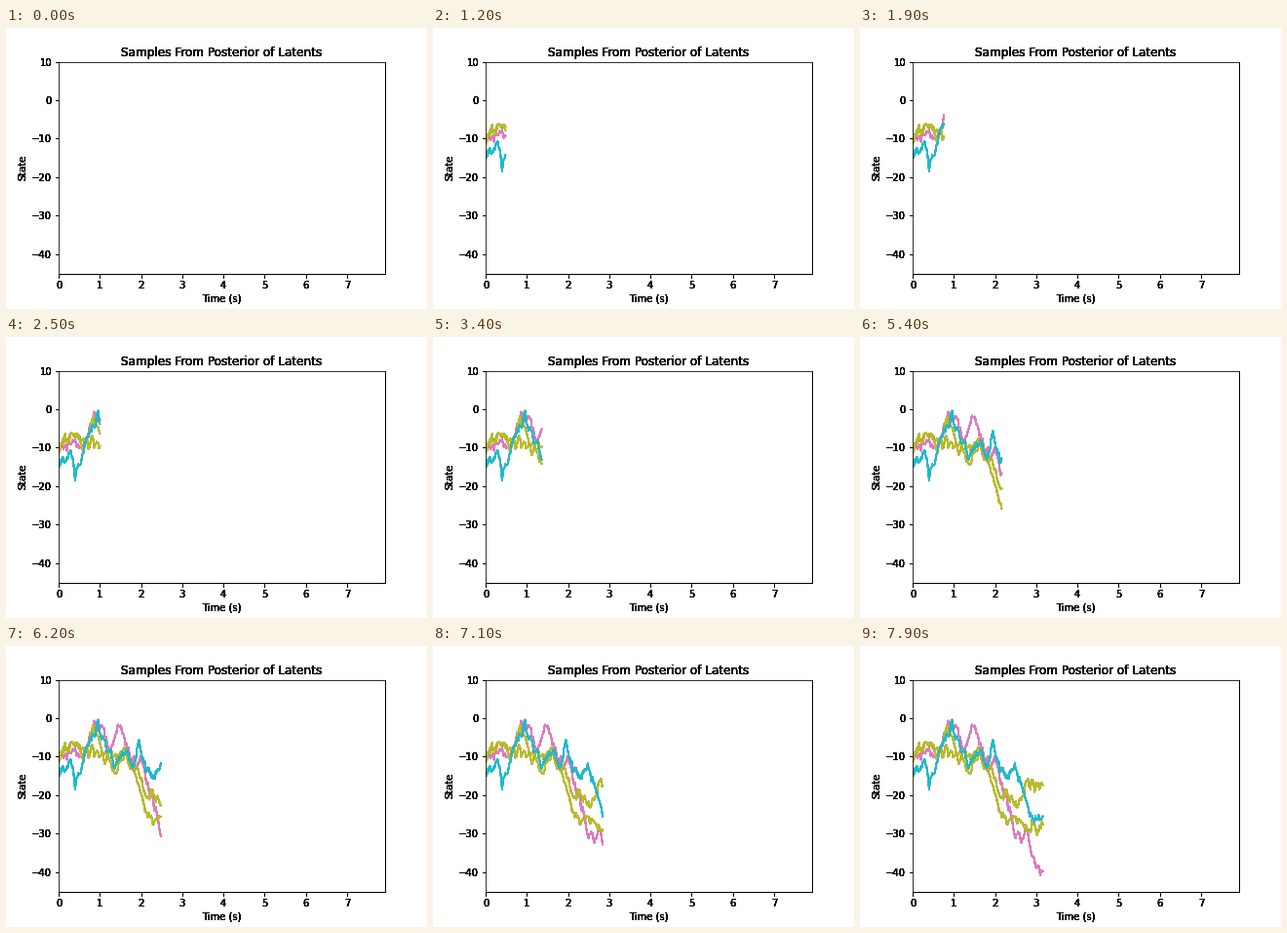
These frames come from a looping animation (432 px wide and 288 px high, 8000 ms). A matplotlib script:

```python
import matplotlib.pyplot as plt
import numpy as np
from matplotlib.animation import FuncAnimation

FRAMES = 80
STEP = 0.04      # seconds of data revealed per frame
SUB = 2          # samples per step
INK_PASSES = 8   # repeated inking fattens the antialiased text

# Turning points (time, state) of each latent, in drawing order
TRENDS = [
    ("C6", [(0, -11), (0.7, -7), (0.88, -1.2), (1, -1.5), (1.25, -8.5),
            (1.45, -2.5), (1.9, -14), (2, -10), (2.5, -31), (2.75, -30),
            (3.2, -43)]),
    ("C8", [(0, -11), (0.2, -7), (0.7, -7), (0.83, -1.5), (1.1, -11),
            (1.4, -12.5), (1.6, -7), (2.1, -25), (2.8, -28), (3.2, -29)]),
    ("C8", [(0, -10), (0.2, -8), (1.7, -10.5), (2.1, -18.5), (2.6, -22),
            (2.8, -17), (3.2, -18.5)]),
    ("C9", [(0, -14), (0.3, -10), (0.4, -17.5), (0.6, -10.5), (0.95, -2),
            (1.4, -12.5), (1.65, -9), (1.8, -11), (1.95, -6.5), (2.15, -14),
            (2.5, -13.5), (2.8, -25), (3.2, -26)]),
]

rng = np.random.default_rng(11)
t = np.arange(FRAMES * SUB) * STEP / SUB


def wander(points):
    """Trend plus a mean-reverting random walk."""
    drift = np.zeros(t.size)
    for i in range(1, t.size):
        drift[i] = 0.75 * drift[i - 1] + rng.normal(0, 0.85)
    return np.interp(t, *zip(*points)) + np.clip(drift, -2, 2)


def make_axes(fig):
    ax = fig.add_subplot()
    ax.set(xlim=(0, 7.92), ylim=(-45.2, 10), xticks=range(8),
           yticks=range(-40, 11, 10), xlabel="Time (s)", ylabel="State",
           title="Samples From Posterior of Latents")
    return ax


plt.rcParams.update({"font.family": "DejaVu Sans", "font.size": 10,
                     "figure.subplot.bottom": 0.125})
fig = plt.figure(figsize=(6, 4), dpi=72, facecolor="white")
for _ in range(INK_PASSES):
    ax = make_axes(fig)

# Overplotting leaves a thick stroke with a grey fringe
curves = []
for color, points in TRENDS:
    y = wander(points)
    for c in ["C7"] * 6 + [color] * 4:
        line, = ax.plot([], [], color=c, lw=1.5)
        curves.append((line, y))


def update(i):
    n = i * SUB + 1 if i else 0
    for line, y in curves:
        line.set_data(t[:n], y[:n])
    return [line for line, _ in curves]


anim = FuncAnimation(fig, update, frames=FRAMES, interval=100,
                     init_func=lambda: update(0), repeat=True,
                     repeat_delay=0, blit=False)
plt.show()
```
